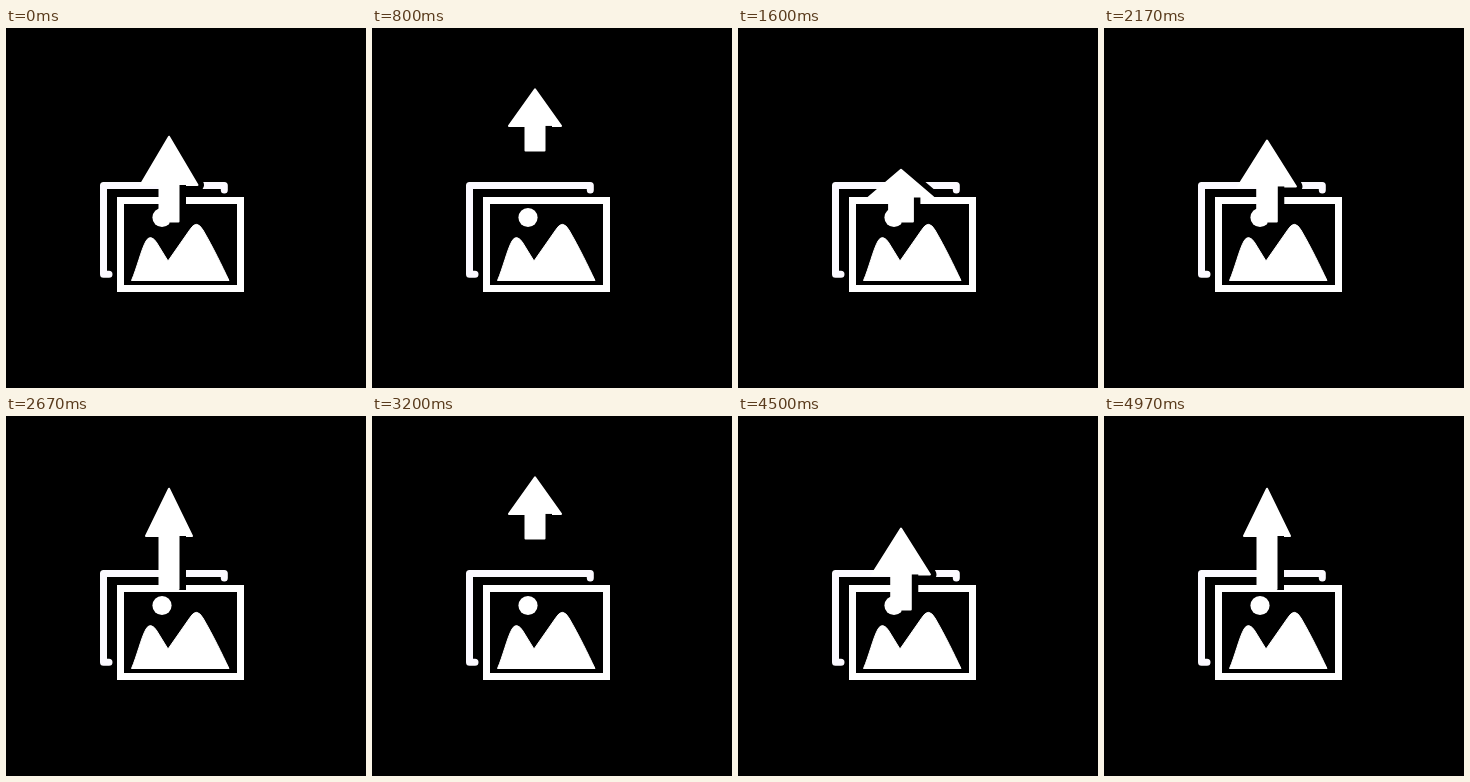
An HTML page for the animation above (5010 ms loop, 360x360 px).

```html
<!DOCTYPE html>
<html lang="en">
<head>
<meta charset="utf-8">
<title>Image upload</title>
<style>
  html, body { margin: 0; width: 100%; height: 100%; overflow: hidden; background: #000; }
  svg { display: block; width: 100vw; height: 100vh; }
  .line { fill: none; stroke: #fff; stroke-width: 7; }
  .round { stroke: #fbf9ff; stroke-linecap: round; stroke-linejoin: round; }
  .solid { fill: #fff; stroke: #fff; stroke-width: 2; stroke-linejoin: round; }
  .hill { fill: #fff; stroke: #fff; }
</style>
</head>
<body>
<svg viewBox="0 0 360 360">
  <defs>
    <clipPath id="right"><path d="M163 0H360V360H163Z"/></clipPath>
  </defs>
  <path class="line round" d="M218.3 162V157.500H97.500V246.300H103"/>
  <g clip-path="url(#right)">
    <path id="headGap" stroke="#000" stroke-width="13" stroke-linejoin="round"/>
  </g>
  <path id="head" class="solid"/>
  <path class="line" d="M114.500 172.500H234.500V260.500H114.500Z"/>
  <path class="hill" d="M125.500 252.500C131 240 135 222 140 213Q144 206 150 213.500L162 233L184 201.500Q190.500 191 197 202C208 221 215 236 223 252.500Z"/>
  <circle cx="156" cy="189.500" r="9.600" fill="#fff"/>
  <path id="shaftGap"/>
  <path id="shaft" class="solid"/>
</svg>
<script>
  const LOOP = 5010, CYCLE = 29, CX = 163, GAP = 6.5;

  const rest = { tip: 107.5, base: 158, half: 29.5, foot: 194.5 };
  const stretch = { tip: 71.5, base: 121, half: 24, foot: 174 };
  const hover = { tip: 57.7, base: 96.5, half: 27, foot: 121 };
  const squash = { tip: 140.5, base: 170.5, half: 33.5, foot: 194.5 };

  const linear = u => u;
  const easeIn = u => u ** 1.6;
  const easeInOut = u => (1 - Math.cos(Math.PI * u)) / 2;

  const mix = (a, b, u) =>
    Object.fromEntries(Object.keys(a).map(k => [k, a[k] + (b[k] - a[k]) * u]));

  // The arrow bobs while it hovers above the picture.
  function hovering(p) {
    const bob = -3 * Math.cos(2 * Math.PI * (p - 8) / 5);
    return { ...hover, tip: hover.tip + bob, base: hover.base + bob, foot: hover.foot + bob };
  }

  function poseAt(p) {
    if (p < 4) return mix(rest, stretch, easeIn(p / 4));
    if (p < 8) return mix(stretch, hovering(8), linear((p - 4) / 4));
    if (p < 14) return hovering(p);
    if (p < 20) return mix(hovering(14), squash, easeIn((p - 14) / 6));
    return mix(squash, rest, easeInOut((p - 20) / 9));
  }

  const setPath = (id, d) => document.getElementById(id).setAttribute('d', d);
  const box = (x0, y0, x1, y1) => `M${x0} ${y0}H${x1}V${y1}H${x0}Z`;

  function drawArrow({ tip, base, half, foot }) {
    const shaft = 10.5 + 0.6 * Math.max(0, half - rest.half);
    // Inset by one unit to leave room for the rounding stroke.
    const triangle = `M${CX} ${tip + 1.2}L${CX + half - 1} ${base - 1}H${CX - half + 1}Z`;
    setPath('head', triangle);
    setPath('headGap', triangle + box(CX, base, CX + shaft - 0.5, foot - 1));
    setPath('shaftGap', box(CX, base - 1, CX + shaft + GAP, foot));
    setPath('shaft', box(CX - shaft + 1, base - 3, CX + shaft - 1, foot - 1));
  }

  // 12.5 poses per second, shown on a 30 Hz grid.
  function draw(now) {
    const tick = Math.floor((now % LOOP + 4) * 0.03);
    const step = Math.min(62, Math.floor(tick / 2.4 + 1e-6));
    drawArrow(poseAt(step % CYCLE));
    requestAnimationFrame(draw);
  }
  draw(performance.now());
</script>
</body>
</html>
```
